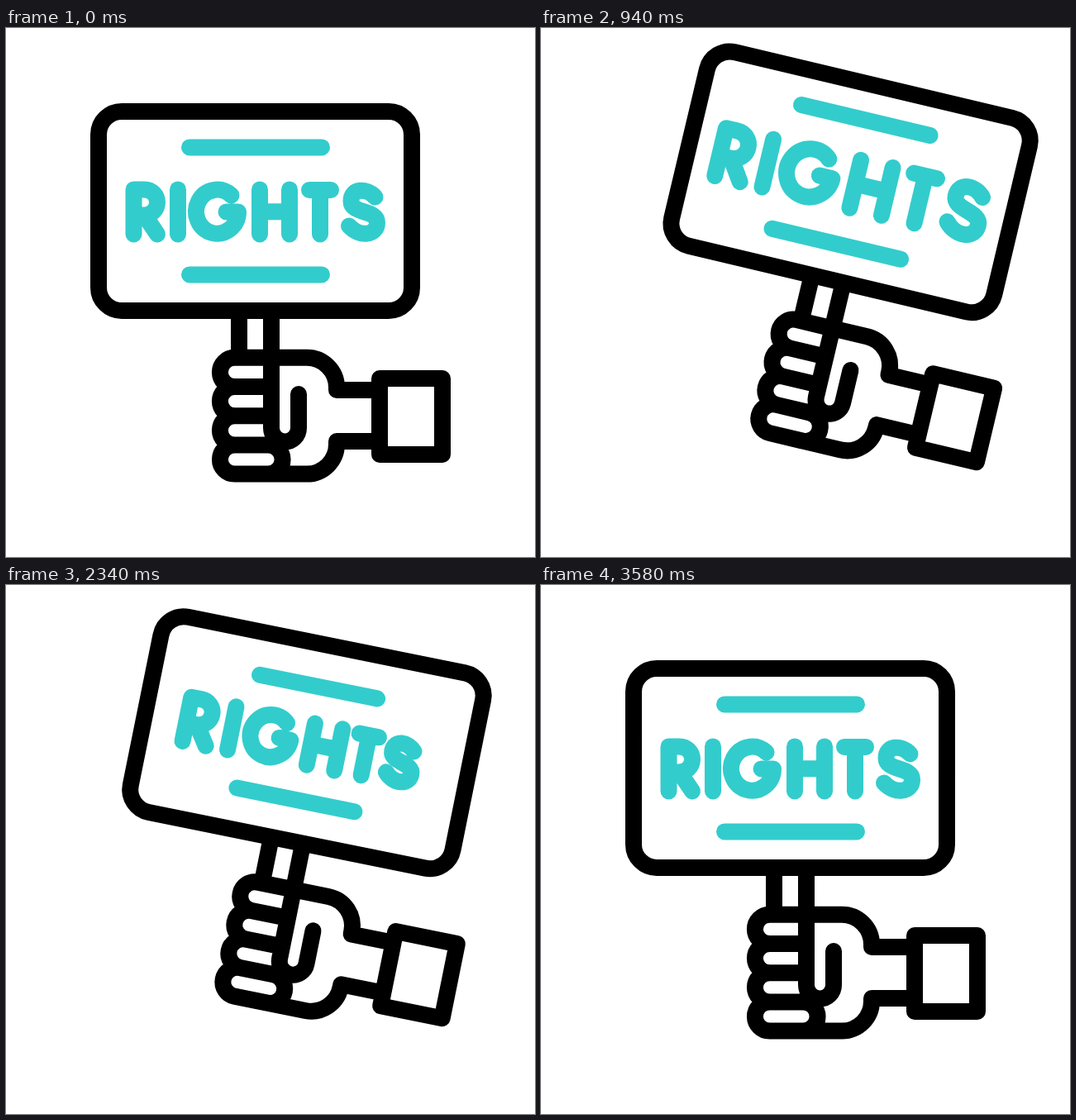
Write an HTML page with a canvas that moves like this. It is 640x640 px and loops after 3600 ms.

```html
<!DOCTYPE html>
<html lang="en">
<head>
<meta charset="utf-8">
<title>Rights sign</title>
<style>
  html, body { margin: 0; width: 100%; height: 100%; overflow: hidden; background: #fff; }
  canvas { display: block; width: 640px; height: 640px; }
</style>
</head>
<body>
<canvas id="stage" width="640" height="640" role="img" aria-label="A hand waving a sign that reads RIGHTS"></canvas>
<script>
const ctx = document.getElementById('stage').getContext('2d');
const TICK = 20, LOOP = 180, REST = 4, CYCLE = 88;
const PIVOT = [488, 516];
const CENTER = [301.5, 221.4];
const TEAL = '#33cccc';

// Letter strokes, measured from the middle of the sign.
const letters = [
  'M-147 28V-26H-134A15.5 15.5 0 0 1 -134 5H-147M-134 5L-118.5 28',
  'M-93.5 -26V28',
  'M-29 -19A25.5 26.5 0 1 0 -20.5 1H-35',
  'M5.5 -26V28M41.5 -26V28M5.5 .8H41.5',
  'M65.5 -25.5H91.5M78.5 -25.5V28',
  'M145 -17C135 -28 116 -28 116 -12C116 4 147.5 -2 147.5 14C147.5 30 126 32 113.5 18'
].map(d => new Path2D(d));
const bars = new Path2D('M-79.5 -77H80.5M-79.5 77H80.5');

const finger = y => `M321 ${y}H276.5A17.6 17.6 0 0 0 276.5 ${y + 35.2}H321`;
const hand = new Path2D([
  'M282 342V398.8M321 342V484A16.5 16.5 0 0 0 354 484V443',
  ...[398.8, 434, 469.2].map(finger),
  'M276.5 504.4H317A17.6 17.6 0 0 1 317 539.6H276.5A17.6 17.6 0 0 1 276.5 504.4',
  'M276.5 398.8H364A36 36 0 0 1 400 434.8V438H452',
  'M276.5 539.6H364A36 36 0 0 0 400 503.6V500H452',
  'M452 424H528V516H452Z'
].join(''));

// Cubic bezier (.33, 0, .17, 1)
function ease(x) {
  let lo = 0, hi = 1;
  for (let i = 0; i < 24; i++) {
    const s = (lo + hi) / 2, r = 1 - s;
    if (3 * r * r * s * .33 + 3 * r * s * s * .17 + s * s * s < x) lo = s; else hi = s;
  }
  return lo * lo * (3 - 2 * lo);
}

// Eased value at time t from [time, value] keys.
function track(t, keys) {
  if (t <= keys[0][0]) return keys[0][1];
  for (let i = 1; i < keys.length; i++) {
    const [t0, a] = keys[i - 1], [t1, b] = keys[i];
    if (t < t1) return a + (b - a) * ease((t - t0) / (t1 - t0));
  }
  return keys[keys.length - 1][1];
}

const tilt = t => track(t, [[4, 0], [14.3, -9.2], [40, 14.5], [92, 0]]);
const shift = (t, far) => track(t, [[4, 0], [14.3, far], [35, 0]]);
const stretch = t => track(t, [[4, 0], [14.3, -23], [35, 11], [45, 11], [92, 0]]);
const barScale = t => track(t, [[5, 1], [15.2, .15], [38.2, 1]]);
function letterScale(t, i) {
  const lag = i * .65;
  return track(t, [[4 + lag, 1], [14.6 + lag, .15], [38 + lag, 1.1], [45 + lag, 1.1], [92, 1]]);
}

// Scales the path about (0, anchorY); the line keeps its weight.
function strokeScaled(path, s, anchorY = 0) {
  const scaled = new Path2D();
  scaled.addPath(path, { a: s, b: 0, c: 0, d: s, e: 0, f: anchorY * (1 - s) });
  ctx.stroke(scaled);
}

function draw(tick) {
  const t = tick < REST ? REST : (tick - REST) % CYCLE + REST;
  ctx.setTransform(1, 0, 0, 1, 0, 0);
  ctx.fillStyle = '#fff';
  ctx.fillRect(0, 0, 640, 640);
  ctx.lineWidth = 20;
  ctx.lineCap = ctx.lineJoin = 'round';

  ctx.translate(PIVOT[0] + shift(t, 8.5), PIVOT[1] + shift(t, 7));
  ctx.rotate(tilt(t) * Math.PI / 180);
  ctx.translate(-PIVOT[0], -PIVOT[1]);
  ctx.strokeStyle = '#000';
  ctx.stroke(hand);

  ctx.translate(...CENTER);
  const half = 189.5 + stretch(t);
  ctx.beginPath();
  ctx.roundRect(-half, -120.5, half * 2, 241, 28);
  ctx.fill();
  ctx.stroke();

  ctx.strokeStyle = TEAL;
  strokeScaled(bars, barScale(t), 8);
  letters.forEach((path, i) => strokeScaled(path, letterScale(t, i)));
}

const start = performance.now();
function frame() {
  draw(Math.floor((performance.now() - start) / TICK) % LOOP);
  requestAnimationFrame(frame);
}
frame();
</script>
</body>
</html>
```
